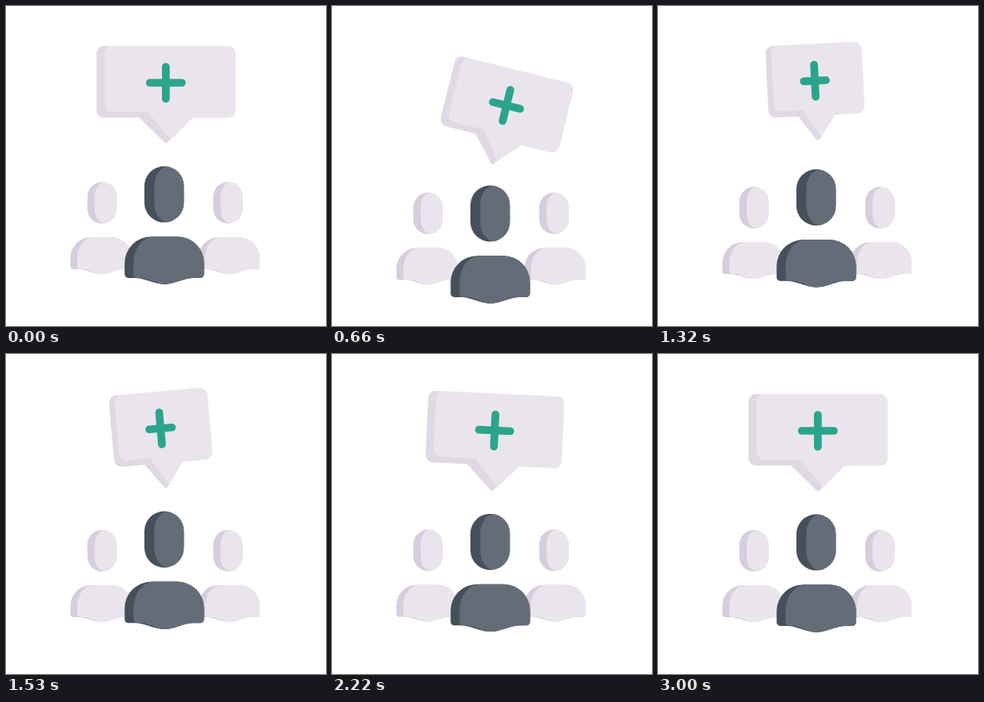
An HTML page with a canvas that plays this animation: 400x400 px, repeating every 5090 ms.

```html
<!DOCTYPE html>
<html lang="en">
<head>
<meta charset="utf-8">
<title>Group message</title>
<style>
  html, body { margin: 0; width: 100%; height: 100%; overflow: hidden; background: #fff; }
  canvas { display: block; width: 100vw; height: 100vh; }
</style>
</head>
<body>
<canvas id="stage"></canvas>
<script>
const SIZE = 400, LOOP = 5090, { PI, cos } = Math;
const canvas = document.getElementById('stage');
const ctx = canvas.getContext('2d');
const ratio = Math.max(1, window.devicePixelRatio || 1);
canvas.width = canvas.height = SIZE * ratio;

const PALE = { light: '#eae5ec', dark: '#d6cede' };
const SLATE = { light: '#646d77', dark: '#46505c' };
const BUBBLE = { light: '#eae5ec', dark: '#e0d9e4' };
const GREEN = '#2aa58c';

// 0 before start, 1 after end, smooth in between.
function ease(t, start, end) {
  const p = Math.min(1, Math.max(0, (t - start) / (end - start)));
  return p * p * (3 - 2 * p);
}

// Goes out to peak, swings back past rest to -dip, then settles at rest.
function swing(t, peak, dip, back, end) {
  return peak * ease(t, 0, 660) - (peak + dip) * ease(t, back, end) + dip * ease(t, 1820, 2350);
}

function fill(color) {
  ctx.fillStyle = color;
  ctx.fill();
}

function pill(x, y, w, h, rx, ry) {
  ctx.beginPath();
  for (let i = 0; i < 4; i++) {
    const cx = i % 3 ? x + w - rx : x + rx;
    const cy = i < 2 ? y + ry : y + h - ry;
    ctx.ellipse(cx, cy, rx, ry, 0, PI + i * PI / 2, PI + (i + 1) * PI / 2);
  }
  ctx.closePath();
}

function head(cx, top, w, h, tone) {
  const x = cx - w / 2, inset = w / 4;
  ctx.save();
  pill(x, top, w, h, w / 2, w / 2);
  fill(tone.dark);
  ctx.clip();
  pill(x + inset, top, w - inset, h, w * 0.37, w / 2);
  fill(tone.light);
  ctx.restore();
}

// Elliptic shoulders above a hem that sags as a cosine wave.
function bodyPath(left, right) {
  const shoulder = 33, hem = 51.6, sag = 3.9, taper = 0.76;
  const rl = left * 0.67, rr = right * 0.67;
  ctx.beginPath();
  ctx.ellipse(rl - left, shoulder, rl, shoulder, 0, PI, PI * 1.5);
  ctx.ellipse(right - rr, shoulder, rr, shoulder, 0, -PI / 2, 0);
  ctx.arcTo(right, hem, 0, hem, 4.5);
  for (let u = 1; u >= -1; u -= 1 / 16) {
    ctx.lineTo(u * taper * (u > 0 ? right : left), hem + sag * (1 + cos(PI * u)));
  }
  ctx.arcTo(-left, hem, -left, shoulder, 4.5);
  ctx.closePath();
}

function body(cx, top, scale, tone) {
  ctx.save();
  ctx.translate(cx, top);
  ctx.scale(scale, scale);
  bodyPath(49.6, 49.6);
  fill(tone.dark);
  bodyPath(38.5, 49.6);
  fill(tone.light);
  ctx.restore();
}

// The tail's tip is the origin; only x positions are squeezed, not radii.
function bubblePath(squeeze, inset) {
  const half = 86.8, top = -122, base = -32.5, tail = 33.5;
  const leftBase = base - inset * 0.75, tip = inset * 0.6;
  const corners = [
    [inset - half, top, 9], [half, top, 9], [half, base, 9], [tail, base, 0],
    [tip, 0.5 - tip, inset ? 0 : 2.5], [inset - tail, leftBase, 0], [inset - half, leftBase, 9]
  ];
  ctx.beginPath();
  ctx.moveTo(0, top);
  for (let i = 1; i <= corners.length; i++) {
    const [x, y, r] = corners[i % corners.length];
    const [nextX, nextY] = corners[(i + 1) % corners.length];
    ctx.arcTo(x * squeeze, y, nextX * squeeze, nextY, r);
  }
  ctx.closePath();
}

function plus(x, y, armX, armY) {
  ctx.beginPath();
  ctx.moveTo(x, y - armY);
  ctx.lineTo(x, y + armY);
  ctx.moveTo(x - armX, y);
  ctx.lineTo(x + armX, y);
  ctx.strokeStyle = GREEN;
  ctx.lineWidth = 9.7;
  ctx.lineCap = 'round';
  ctx.stroke();
}

function bubble(t) {
  const squeeze = 1 - 0.375 * ease(t, 440, 1020) + 0.085 * ease(t, 1020, 1450) + 0.29 * ease(t, 1800, 2300);
  const tilt = swing(t, 14, 5, 630, 1505) + 4 * (ease(t, 1820, 2350) - ease(t, 2350, 2980));
  ctx.save();
  ctx.translate(200, 172 + swing(t, 26.3, 3.3, 630, 1385));
  ctx.rotate(tilt * PI / 180);
  bubblePath(squeeze, 0);
  fill(BUBBLE.dark);
  bubblePath(squeeze, 10);
  fill(BUBBLE.light);
  plus(-0.2, -76, 20 * squeeze, 20);
  ctx.restore();
}

function draw(t) {
  ctx.setTransform(ratio, 0, 0, ratio, 0, 0);
  ctx.fillStyle = '#fff';
  ctx.fillRect(0, 0, SIZE, SIZE);

  const side = swing(t, 13.2, 4, 950, 1790);
  const lead = swing(t, 24, 4, 842, 1577);
  for (const dir of [-1, 1]) {
    head(198.7 + dir * 78.7, 220 + side, 36.6, 52, PALE);
    body(198.8 + dir * 79.8, 289 + side, 0.775, PALE);
  }
  head(197.7, 200.3 + lead, 49.4, 70.3, SLATE);
  body(197.9, 288.3 + lead, 1, SLATE);
  bubble(t);
}

const start = performance.now();
function tick() {
  draw((performance.now() - start) % LOOP);
  requestAnimationFrame(tick);
}
tick();
</script>
</body>
</html>
```
